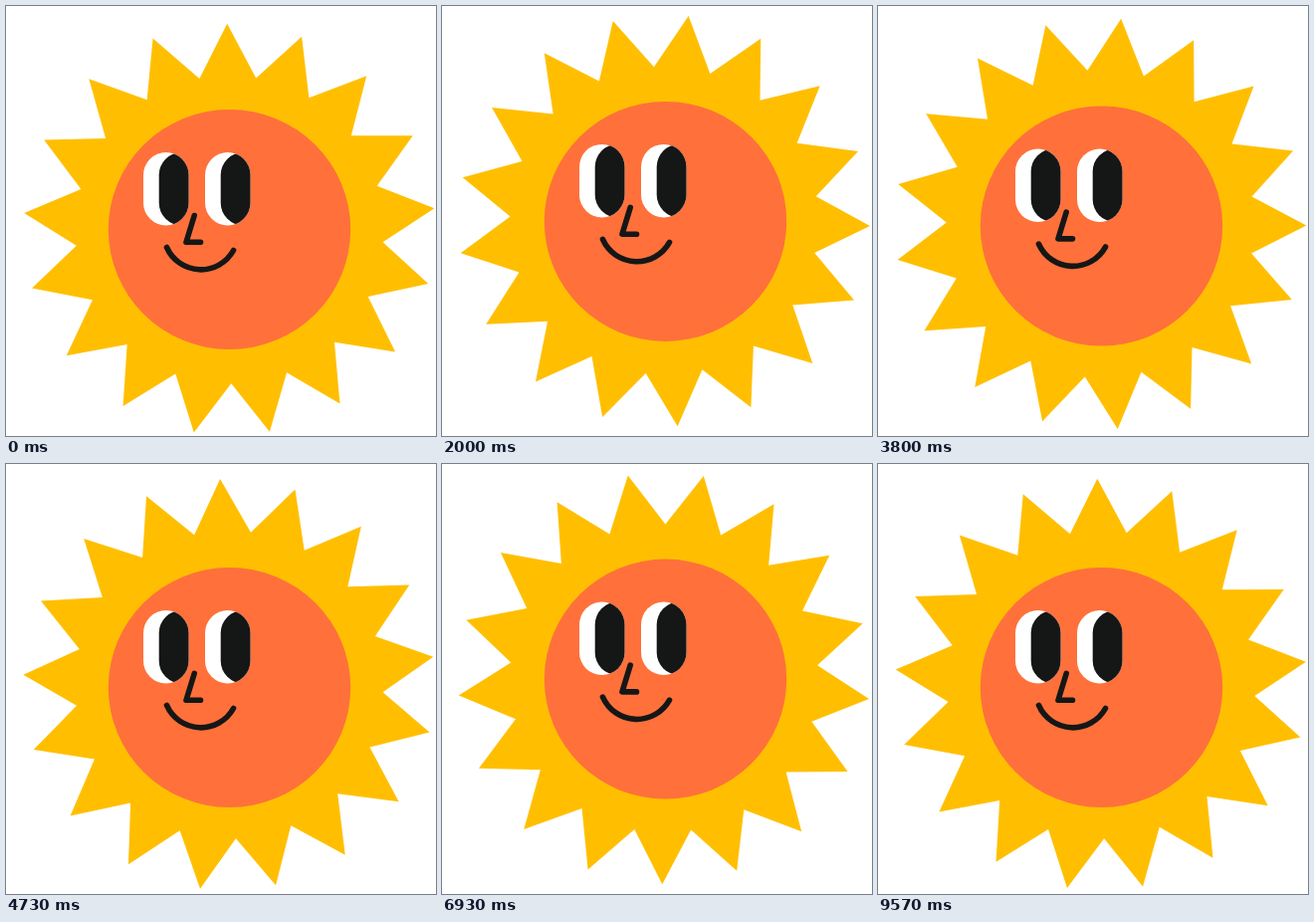
An HTML page that plays this animation: 432 px wide and 432 px high, repeating every 9.61 s.

```html
<!DOCTYPE html>
<html lang="en">
<head>
<meta charset="utf-8">
<title>Smiling sun</title>
<style>
  html, body { margin: 0; width: 100%; height: 100%; overflow: hidden; background: #fff; }
  svg { display: block; width: 100%; height: 100%; }
</style>
</head>
<body>
<svg viewBox="0 0 432 432">
  <defs>
    <rect id="eye" width="45.5" height="73.5" rx="22.75"/>
    <clipPath id="eyeClip"><use href="#eye"/></clipPath>
    <g id="look">
      <use href="#eye" fill="#fff"/>
      <g clip-path="url(#eyeClip)"><use href="#eye" x="15.7" fill="#151716"/></g>
    </g>
  </defs>
  <g id="sun">
    <polygon id="rays" fill="#ffbf00"/>
    <ellipse rx="121.7" ry="120.5" fill="#ff703b"/>
    <use href="#look" x="-86.5" y="-77.5"/>
    <use href="#look" x="-24.5" y="-77.5"/>
    <g fill="none" stroke="#151716" stroke-width="5.6" stroke-linecap="round" stroke-linejoin="round">
      <path d="M-35.3-14L-43.5 12.8H-29"/>
      <path d="M-63 18A37.4 37.4 0 0 0 4 21"/>
    </g>
  </g>
</svg>
<script>
const LOOP = 9610, CYCLE = 120, SPIKES = 17;
const TIP = 207, VALLEY = 154.6;
const sun = document.getElementById('sun');
const rays = document.getElementById('rays');

// The star sits slightly below its pivot, so it wobbles as it turns.
rays.setAttribute('points', Array.from({ length: SPIKES * 2 }, (_, i) => {
  const angle = i * Math.PI / SPIKES;
  const r = i % 2 ? VALLEY : TIP;
  return [r * Math.sin(angle), 1.5 - r * Math.cos(angle)].map(v => v.toFixed(2));
}).join(' '));

// 25 steps a second, with a longer hold at the start of each second.
function stepAt(ms) {
  const m = ms % 1000;
  const step = m < 70 ? 0 : m < 100 ? 1 : Math.floor((m - 10) / 40);
  return Math.floor(ms / 1000) * 25 + step;
}

function draw() {
  const step = stepAt(performance.now() % LOOP) % CYCLE;
  const y = 220.15 + 4.35 * Math.cos(2 * Math.PI * step / CYCLE);
  sun.setAttribute('transform', `translate(224.5 ${y})`);
  rays.setAttribute('transform', `translate(0 -1.3) rotate(${1.42 * step - 0.65})`);
  requestAnimationFrame(draw);
}
draw();
</script>
</body>
</html>
```
